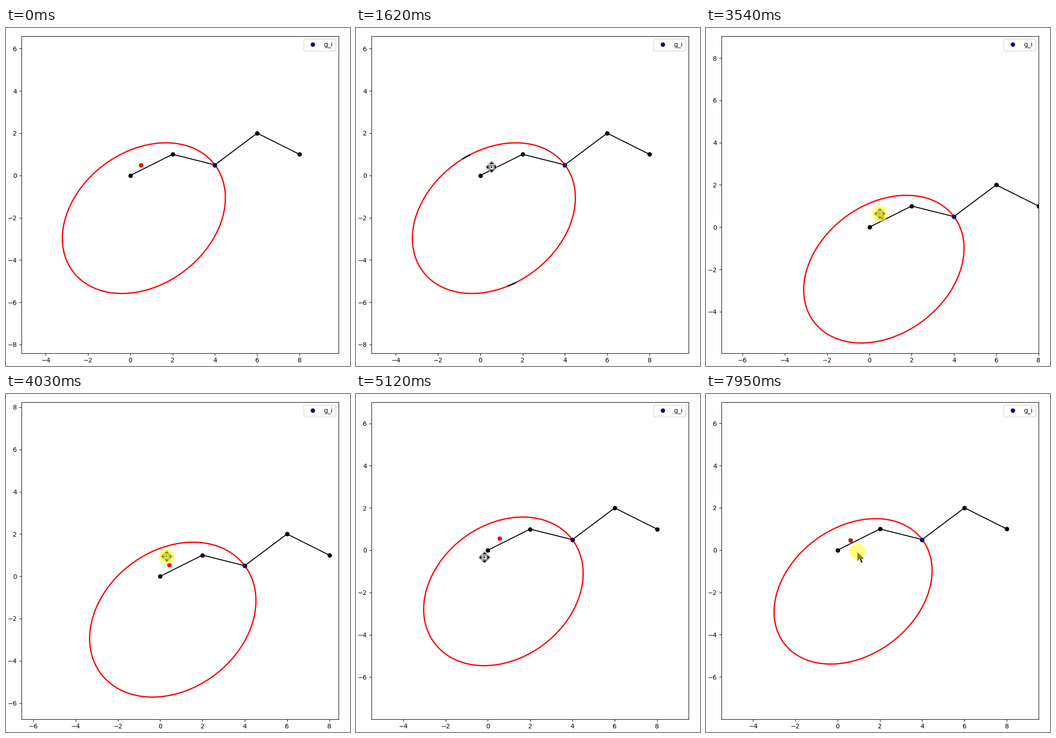
Recreate the animation shown at these times as a matplotlib script. Size 755 px wide and 742 px high, loop 8000 ms.

```python
import numpy as np
import matplotlib.pyplot as plt
from matplotlib.animation import FuncAnimation
from matplotlib.patches import Circle, Polygon
from matplotlib.ticker import MultipleLocator

W, H, DPI = 755, 742, 100
LOOP, STEP = 8000, 40
LEFT, TOP, SIDE = 33.95, 17.5, 696
SPAN = 15
UNIT = SIDE / SPAN
NAVY = "#0c0c68"

JOINTS = np.array([(0, 0), (2, 1), (4, 0.5), (6, 2), (8, 1)])
G = JOINTS[2]
AXIS = (JOINTS[3] - G) / np.hypot(*(JOINTS[3] - G))
NORMAL = np.array([-AXIS[1], AXIS[0]])

PAN_ON, PAN_OFF, GONE = 2390, 5060, 5300
BACK, PRESS = 6140, 7570
LAG = 180                          # the view trails the pointer while panning
ORIGIN = np.array([272.9, 323.7])  # pixel place of (0, 0) before panning

# Key points: ms, x, y
PAN = [(PAN_ON, 0, 0), (2890, 28.5, 3.5), (3540, 85.7, 113.5),
       (4470, 38.5, 35), (5220, 16, 19)]
HANDLE = [(PAN_ON, 0.5, 0.5), (2890, 0.68, 0.45), (3540, 0.563, 0.478),
          (4470, 0.33, 0.602), (5220, 0.571, 0.55),
          (PRESS, 0.571, 0.55), (7950, 0.614, 0.474)]
ENTER = [(190, 592, 750), (420, 410, 625), (570, 305, 485), (820, 229, 269),
         (980, 279, 329), (1340, 291, 318), (1800, 299.5, 301)]
ARROW = [(BACK, 405, 745), (6300, 408, 545), (6490, 320, 403), (6640, 243, 340),
         (6940, 333, 305), (PRESS, 318, 317), (7940, 332, 346)]
# Dark spots left where the pointer crossed the curve: start, end, angle
MARKS = [(820, PAN_ON, 80.5), (500, PAN_ON, 253.4),
         (5200, PRESS, 163.2), (6300, PRESS, 270.2)]


def glide(keys, t):
    """Smooth path through the keys without overshoot."""
    keys = np.array(keys, float)
    ts, p = keys[:, 0], keys[:, 1:]
    h = np.diff(ts)[:, None]
    s = np.diff(p, axis=0) / h
    same = s[:-1] * s[1:] > 0
    m = np.zeros_like(p)
    m[1:-1] = np.where(same, 2 * s[:-1] * s[1:] / np.where(same, s[:-1] + s[1:], 1), 0)
    t = np.clip(t, ts[0], ts[-1])
    i = min(np.searchsorted(ts, t, "right") - 1, len(h) - 1)
    u = (t - ts[i]) / h[i]
    bend = m[i] * u * (1 - u) ** 2 - m[i + 1] * u ** 2 * (1 - u)
    return p[i] + (p[i + 1] - p[i]) * u * u * (3 - 2 * u) + h[i] * bend


def pointer_at(t):
    if t >= BACK:
        return glide(ARROW, t)
    pos = glide(ENTER, t) + glide(PAN, t + LAG)
    leave = max(0, (t - PAN_OFF) / (GONE - PAN_OFF))
    return pos + leave ** 2 * np.array([-300, 348])


def ellipse(handle, start=0, end=360, n=240):
    """Vertex at G, half axes 1.5 times the handle's local offset."""
    a = 1.5 * (G - handle) @ AXIS
    b = 1.5 * (handle - G) @ NORMAL
    th = np.radians(np.linspace(start, end, n))[:, None]
    pts = G - a * AXIS + a * np.cos(th) * AXIS + b * np.sin(th) * NORMAL
    return pts.T


fig = plt.figure(figsize=(W / DPI, H / DPI), dpi=DPI, facecolor="white")
ax = fig.add_axes([LEFT / W, 1 - (TOP + SIDE) / H, SIDE / W, SIDE / H])
for axis in (ax.xaxis, ax.yaxis):
    axis.set_major_locator(MultipleLocator(2))

curve, = ax.plot([], [], color="red", lw=2, zorder=2)
marks = [ax.plot([], [], color="black", lw=2, solid_capstyle="butt", zorder=2.1)[0]
         for _ in MARKS]
ax.plot(*JOINTS.T, "o-", color="black", zorder=3)
joint, = ax.plot(*G, "o", color=NAVY, zorder=5)
dot, = ax.plot([], [], "o", color="red", zorder=4)
ax.plot([], [], "o", color=NAVY, label="g_i")
ax.legend(loc="upper right", labelcolor="#1e0014")

# Overlay in pixels, y down
over = fig.add_axes([0, 0, 1, 1], zorder=10)
over.set(xlim=(0, W), ylim=(H, 0))
over.axis("off")
over.plot([W - 0.5] * 2, [0, H], color="#e6e6e6", lw=0.72)


class Pointer:
    def __init__(self, parts):
        self.parts = []
        for pts, style in parts:
            pts = np.array(pts, float)
            patch = Polygon(pts, **style)
            over.add_patch(patch)
            self.parts.append((patch, pts))

    def place(self, pos, shown):
        for patch, pts in self.parts:
            patch.set_xy(pts + pos)
            patch.set_visible(shown)


def ring(r, n, turn=0.0):
    a = turn + np.arange(n) * 2 * np.pi / n
    return np.column_stack([r * np.cos(a), r * np.sin(a)])


def wedge(quarter):
    c, s = np.cos(quarter * np.pi / 2), np.sin(quarter * np.pi / 2)
    return np.array([(0, -11.5), (5, -6.5), (-5, -6.5)]) @ np.array([[c, s], [-s, c]])


solid = dict(fc="#101010", ec="none")
mover = Pointer(
    [(ring(13, 4), dict(fc="#f4f4f4", ec="#8c8c8c", lw=0.7))]
    + [(wedge(q), solid) for q in range(4)]
    + [(ring(6.5, 4, np.pi / 4), dict(fc="white", ec="#202020", lw=0.9)),
       (ring(1.9, 12), solid)])
arrow = Pointer([([(0, 0), (0, 21), (5, 16.5), (8.5, 25), (12, 23.5), (8.7, 15.5), (15, 15.5)],
                  dict(fc="#101010", ec="#d2d2d2", lw=0.9))])
glow = Circle((0, 0), 17.5, fc="#ffff00", ec="none", alpha=0.5, zorder=5)
over.add_patch(glow)


def update(i):
    t = i * STEP + STEP / 2
    x, y = ORIGIN + glide(PAN, t)
    x0, y1 = (LEFT - x) / UNIT, (y - TOP) / UNIT
    ax.set(xlim=(x0, x0 + SPAN), ylim=(y1 - SPAN, y1))

    handle = glide(HANDLE, t)
    dot.set_data(*handle[:, None])
    dot.set_color("#c01010" if t > PRESS else "red")
    curve.set_data(*ellipse(handle))
    joint.set_color("blue" if 4070 <= t < 4890 else NAVY)
    for line, (start, end, angle) in zip(marks, MARKS):
        line.set_data(*ellipse(handle, angle - 3, angle + 3, 12))
        line.set_visible(start <= t < end)

    pos = pointer_at(t)
    mover.place(pos, 190 <= t < GONE)
    arrow.place(pos, t >= BACK)
    glow.center = tuple(pos)
    glow.set_visible(PAN_ON <= t < PAN_OFF or t >= PRESS)
    return []


anim = FuncAnimation(fig, update, frames=LOOP // STEP, interval=STEP,
                     repeat=True, repeat_delay=0, blit=False)
plt.show()
```
